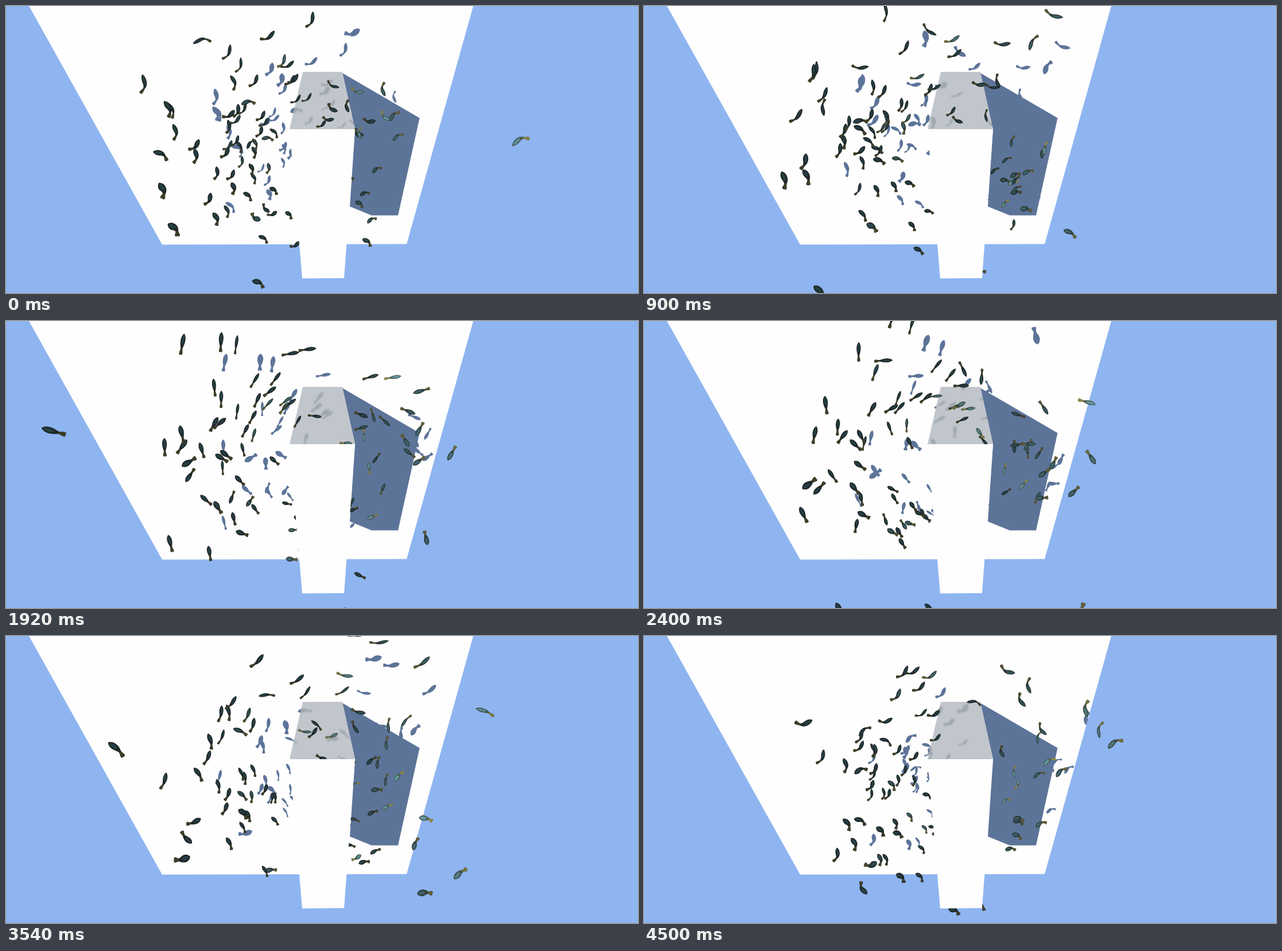
Animation of 1101x501 px, one loop 4600 ms. Source, as an HTML page with a canvas:

```html
<!DOCTYPE html>
<html lang="en">
<head>
<meta charset="utf-8">
<title>Shoal around a pillar</title>
<style>
  html, body { margin: 0; width: 100%; height: 100%; overflow: hidden; background: #8fb5f1; }
  canvas { display: block; }
</style>
</head>
<body>
<canvas id="stage" width="1101" height="501"></canvas>
<script>
const ctx = document.getElementById('stage').getContext('2d');
const W = 1101, H = 501, LOOP = 4600, STEP = 60, TAU = Math.PI * 2;
const COUNT = 84, WARP = 0.45;

const poly = (...p) => {
  const path = new Path2D();
  for (let i = 0; i < p.length; i += 2) path.lineTo(p[i], p[i + 1]);
  path.closePath();
  return path;
};
const FLOOR = poly(40, 0, 814, 0, 698, 415.5, 272, 416.5);
const TOP = poly(517, 115, 586, 115, 608, 215, 494, 215);
const FRONT = poly(494, 215, 608, 215, 589, 475, 516, 475.5);
const SHADE = poly(586, 117, 720.5, 195.5, 683, 365.5, 637, 365.5, 599, 350, 608, 215);

const clamp = (v, a = 0, b = 1) => Math.min(b, Math.max(a, v));
const mix = (a, b, k) => `rgb(${a.map((v, i) => Math.round(v + (b[i] - v) * k))})`;

let seed = 90217;
const rnd = (a = 0, b = 1) => a + (b - a) * ((seed = (seed * 16807) % 2147483647) / 2147483647);

// A fish circles the pillar and strays furthest out, by `far`, at time t0
function makeFish(t0, angle, far) {
  return {
    t0, angle, far,
    cx: 535 + rnd(-45, 25), cy: 250 + rnd(-50, 50),
    near: Math.min(far, rnd(85, 225)),
    spin: (rnd() < 0.85 ? 1 : -1) * 0.11 / (60 + far * 0.5),
    wander: rnd(0, TAU),
    yaw: rnd(-0.45, 0.45),
    tone: rnd() < 0.2 ? 0.75 : rnd(0, 0.25),
    girth: rnd(0.8, 1.2),
    lift: rnd(0.6, 1.2),
    casts: rnd() < 0.6,
    shade: rnd(0.18, 0.42)
  };
}

const shoal = [
  makeFish(0, -0.1, 330),
  makeFish(2400, Math.PI + 0.28, 480),
  makeFish(3000, 0.17, 240)
];
while (shoal.length < COUNT)
  shoal.push(makeFish(rnd(0, LOOP), rnd(0, TAU), 75 + 260 * rnd() ** 1.5));

function place(f, t) {
  const d = t - f.t0;
  const p = f.angle + f.spin * d;
  const a = p + WARP * Math.sin(p);
  const r = f.near + (f.far - f.near) * Math.exp(-((d / 850) ** 2));
  const w = t / 450 + f.wander;
  return [f.cx + 1.12 * r * Math.cos(a) + 14 * Math.sin(w),
          f.cy + r * Math.sin(a) + 14 * Math.cos(w * 0.8)];
}

function pose(f, t) {
  const [x, y] = place(f, t);
  const [ax, ay] = place(f, t - 20), [bx, by] = place(f, t + 20);
  const speed = Math.hypot(bx - ax, by - ay) || 1;
  // Rising towards the camera leans every heading up and left
  const dir = Math.atan2((by - ay) / speed - 0.4, (bx - ax) / speed - 0.4) + f.yaw;
  const low = clamp((y - 90) / 250);
  const sway = 0.1 + 0.9 * Math.cos(Math.PI * t / LOOP) ** 2;
  return {
    ...f, x, y, dir,
    len: 14 + 0.06 * Math.hypot(x - 550, y - 330),
    wide: (0.2 + low * (0.07 + 0.13 * Math.abs(Math.cos(dir)))) * f.girth,
    bend: sway * Math.cos(TAU * t / 450),
    light: clamp(f.tone + (x - 620) / 350, 0, 0.9)
  };
}

// Half width along the body: a rounded trunk, then a flaring tail fin
const halfWidth = s => s < 0.75
  ? 0.12 + 0.88 * Math.sin(Math.PI * (s / 0.8) ** 0.75)
  : 0.3 + 0.42 * Math.sin((s - 0.75) * 9);

function addBody(path, p, from = 0, to = 10, slim = 1) {
  const seg = p.len / 10, left = [], right = [];
  let x = p.x + Math.cos(p.dir) * p.len * 0.45;
  let y = p.y + Math.sin(p.dir) * p.len * 0.45;
  for (let i = 0; i <= to; i++) {
    const s = i / 10;
    const a = p.dir + Math.PI + p.bend * clamp((s - 0.35) / 0.4);
    const w = halfWidth(s) * p.len * p.wide * 0.5 * slim;
    if (i >= from) {
      left.push([x - Math.sin(a) * w, y + Math.cos(a) * w]);
      right.unshift([x + Math.sin(a) * w, y - Math.cos(a) * w]);
    }
    x += Math.cos(a) * seg;
    y += Math.sin(a) * seg;
  }
  left.concat(right).forEach(([qx, qy], i) => i ? path.lineTo(qx, qy) : path.moveTo(qx, qy));
  path.closePath();
}

function paintPart(p, dark, light, from, to, slim) {
  const path = new Path2D();
  addBody(path, p, from, to, slim);
  ctx.fillStyle = mix(dark, light, p.light);
  ctx.fill(path);
}

function drawFish(p) {
  paintPart(p, [31, 40, 37], [84, 104, 92], 0, 10, 1);
  paintPart(p, [62, 62, 40], [152, 144, 82], 7, 10, 0.9);
  paintPart(p, [37, 62, 70], [105, 165, 182], 1, 5, 0.5);
}

function fillIn(area, path, color, blur) {
  ctx.save();
  ctx.clip(area);
  ctx.filter = `blur(${blur}px)`;
  ctx.fillStyle = color;
  ctx.fill(path);
  ctx.restore();
}

function drawShadows(poses) {
  const path = new Path2D();
  for (const p of poses) {
    if (!p.casts || p.y > 390) continue;
    addBody(path, {
      ...p,
      x: p.x + (50 + (552 - p.x) * 0.22) * p.lift,
      y: p.y + (220 - p.y) * 0.25 * p.lift,
      len: p.len * 0.85,
      wide: p.shade
    });
  }
  ctx.fillStyle = '#5d7499';
  ctx.fill(SHADE);
  fillIn(FLOOR, path, '#5d7499', 0.7);
  ctx.fillStyle = '#c1c6cc';
  ctx.fill(TOP);
  fillIn(TOP, path, 'rgba(110, 120, 128, 0.4)', 1);
}

function draw(t) {
  ctx.fillStyle = '#8fb5f1';
  ctx.fillRect(0, 0, W, H);
  ctx.fillStyle = '#fefefe';
  ctx.fill(FLOOR);
  const poses = shoal.map(f => pose(f, t)).sort((a, b) => a.len - b.len);
  drawShadows(poses);
  poses.forEach(drawFish);
  ctx.fillStyle = '#fefefe';
  ctx.fill(FRONT);
}

const start = performance.now();
function tick() {
  const t = (performance.now() - start) % LOOP;
  draw(Math.min(4500, Math.floor(t / STEP) * STEP));
  requestAnimationFrame(tick);
}
tick();
</script>
</body>
</html>
```
